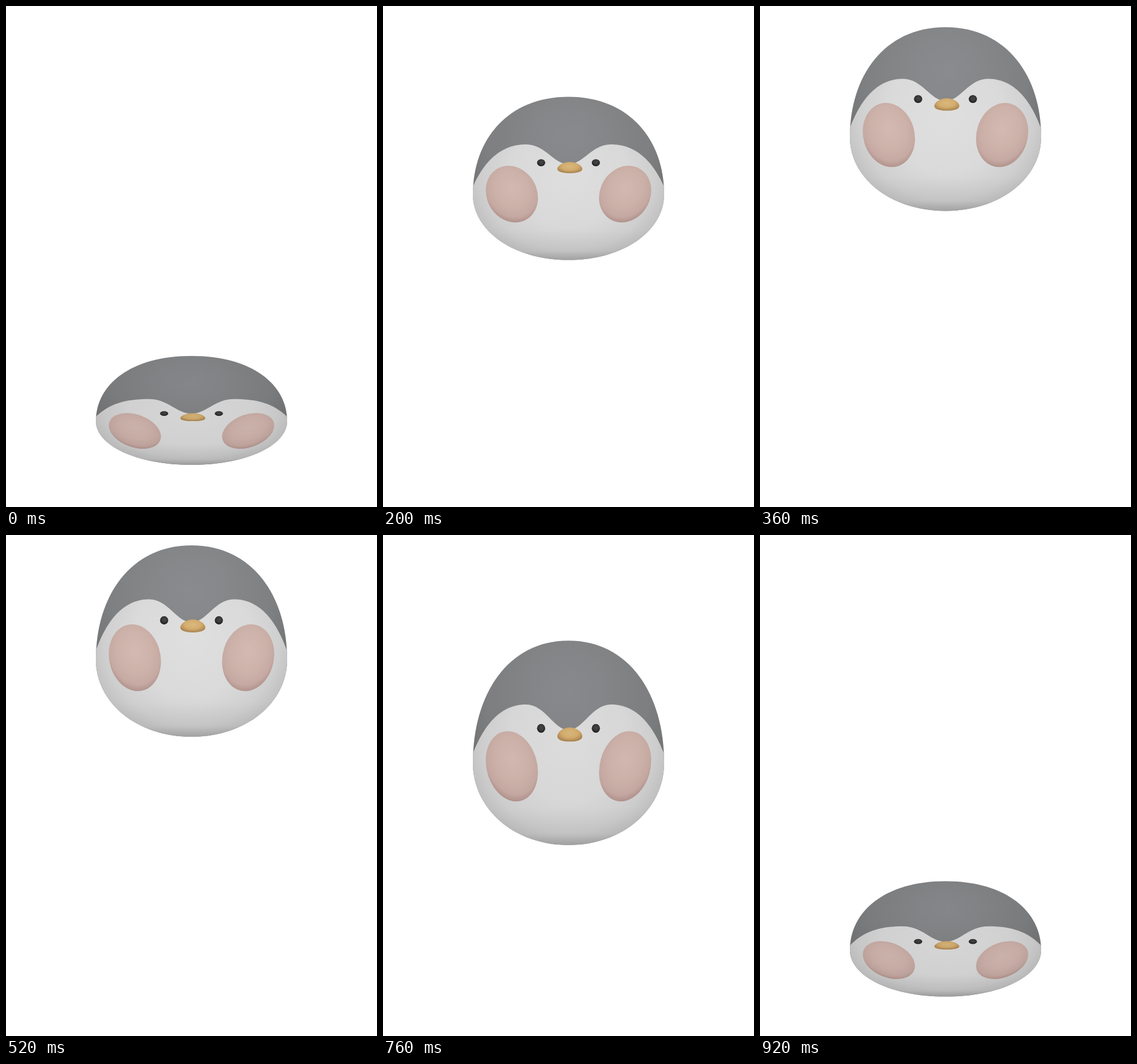
Write an HTML page with a canvas that moves like this. It is 644 px wide and 869 px high and loops after 960 ms.

```html
<!DOCTYPE html>
<html lang="en">
<head>
<meta charset="utf-8">
<title>Bouncing penguin</title>
<style>
  html, body { margin: 0; width: 100%; height: 100%; overflow: hidden; background: #fff; }
  canvas { display: block; width: 644px; height: 869px; }
</style>
</head>
<body>
<canvas id="stage" width="644" height="869"></canvas>
<script>
const ctx = document.getElementById('stage').getContext('2d');
const LOOP = 960, STEP = 40, APEX = 480;
const MID = 322, UNIT = 332; // body axis and its height at rest
const HIGH = 182, LOW = 701.5, SQUASHED = 189;

const part = (t, from, to) => Math.min(1, Math.max(0, (t - from) / (to - from)));
const smooth = s => s * s * (3 - 2 * s);
const easeOut = s => 1 - (1 - s) ** 2;

// Eases with flat ends; a and b are the handle times
function ease(s, a, b) {
  let lo = 0, hi = 1;
  for (let i = 0; i < 30; i++) {
    const u = (lo + hi) / 2, v = 1 - u;
    if (3 * v * v * u * a + 3 * v * u * u * b + u ** 3 < s) lo = u; else hi = u;
  }
  return smooth(lo);
}

// drop: 0 at the apex, 1 on the ground; tilt: 0 seen straight on, 1 from above
function pose(t) {
  const rising = t < APEX;
  const drop = rising ? 1 - ease(part(t, 0, APEX), .35, .035) : ease(part(t, APEX, 930), .85, .68);
  const h = SQUASHED + 134 * easeOut(part(t, 0, 440))
    + 85 * smooth(part(t, APEX, 680)) - 219 * smooth(part(t, 665, LOOP));
  const tilt = (drop * SQUASHED / h) ** (rising ? 1.2 : .75);
  return { top: HIGH + (LOW - HIGH) * drop - h / 2, h, tilt };
}

function fade(gradient, ...stops) {
  stops.forEach(([at, color]) => gradient.addColorStop(at, color));
  return gradient;
}
const radial = (x, y, r, ...stops) => fade(ctx.createRadialGradient(x, y, 0, x, y, r), ...stops);
const linear = (y0, y1, ...stops) => fade(ctx.createLinearGradient(0, y0, 0, y1), ...stops);

const body = new Path2D(`M322 0 C216 0 156 88 156 198.5 C156 272 226 332 322 332
  C418 332 488 272 488 198.5 C488 88 428 0 322 0Z`);
const disc = new Path2D();
disc.arc(0, 0, 1, 0, 7);
const bill = new Path2D('M0 -1 C.55 -1 1 -.3 1 .25 C1 .8 .5 1 0 1 C-.5 1 -1 .8 -1 .25 C-1 -.3 -.55 -1 0 -1Z');

const furShade = radial(MID, 80, 185, [0, '#8a8b8f'], [.35, '#868789'], [.75, '#7f8082'], [1, '#757677']);
const faceShade = radial(MID, 160, 186, [0, '#dfdfdf'], [.55, '#dadada'], [.82, '#cfcfcf'], [1, '#bebebe']);
const footShade = linear(270, 332, [0, 'rgba(0,0,0,0)'], [.7, 'rgba(0,0,0,.05)'], [1, 'rgba(0,0,0,.18)']);
const cheekShade = radial(0, -.2, 1.2, [0, '#d2b9b1'], [.55, '#cdb2aa'], [.84, '#c5a9a2'], [1, '#b1938c']);
const eyeShade = radial(.05, -.15, 1.1, [0, '#474747'], [.55, '#3a3a3a'], [1, '#1c1c1c']);
const billShade = radial(0, -.2, 1.2, [0, '#dab87c'], [.55, '#d3ad6e'], [1, '#a9834e']);

// A unit shape placed with the given radii; lean shears it downwards to the right
function put(shape, fill, x, y, rx, ry, lean = 0) {
  ctx.save();
  ctx.transform(rx, ry * lean, 0, ry * Math.sqrt(1 - lean * lean), x, y);
  ctx.fillStyle = fill;
  ctx.fill(shape);
  ctx.restore();
}

function fillFace(mix) {
  const edge = mix(183, 185), peak = mix(93, 131.5), dip = mix(133, 176);
  const rise = mix(143, 146), inX = mix(14, 24), outX = mix(41, 50);
  ctx.beginPath();
  ctx.moveTo(150, 340);
  ctx.lineTo(150, edge + 12);
  ctx.lineTo(156, edge);
  ctx.bezierCurveTo(156 + inX, rise, 156 + outX, peak, 248, peak);
  ctx.bezierCurveTo(282, peak, 296, dip, MID, dip);
  ctx.bezierCurveTo(348, dip, 362, peak, 396, peak);
  ctx.bezierCurveTo(488 - outX, peak, 488 - inX, rise, 488, edge);
  ctx.lineTo(494, edge + 12);
  ctx.lineTo(494, 340);
  ctx.closePath();
  ctx.fillStyle = faceShade;
  ctx.fill();
}

function draw(t) {
  const { top, h, tilt } = pose(t);
  const mix = (a, b) => a + (b - a) * tilt;
  ctx.clearRect(0, 0, 644, 869);
  ctx.save();
  ctx.translate(0, top);
  ctx.scale(1, h / UNIT);

  ctx.fillStyle = furShade;
  ctx.fill(body);
  ctx.save();
  ctx.clip(body);
  fillFace(mix);
  ctx.fillStyle = footShade;
  ctx.fillRect(150, 0, 344, UNIT);
  ctx.restore();

  const eyeY = mix(129.5, 175.5), cheekY = mix(194.5, 228.4), lean = mix(.11, .31);
  for (const side of [-1, 1]) {
    put(disc, cheekShade, MID + side * 98.3, cheekY, 45.3, mix(58, 54.4), -side * lean);
    put(disc, eyeShade, MID + side * 47.5, eyeY, 7.1, 7.2);
  }
  put(bill, billShade, 324.3, eyeY + mix(9.7, 11), 21.7, mix(11.2, 12.2));

  // Slightly darker when low
  ctx.fillStyle = `rgba(0,0,0,${.04 * tilt})`;
  ctx.fill(body);
  ctx.restore();
}

function tick() {
  const t = performance.now() % LOOP;
  draw(Math.floor(t / STEP) * STEP);
  requestAnimationFrame(tick);
}
tick();
</script>
</body>
</html>
```
